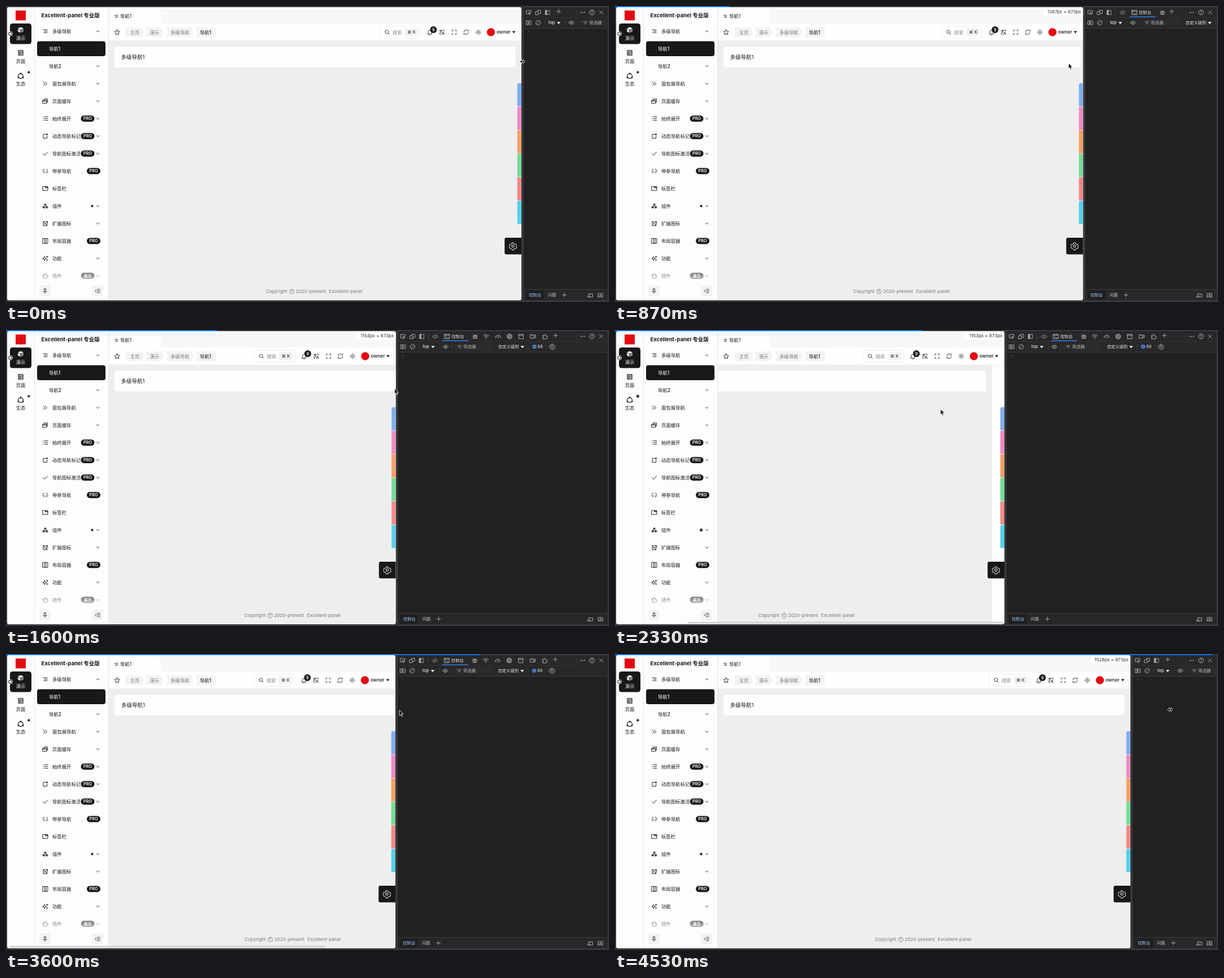
Animation of 1067 by 525 pixels, one loop 4590 ms. Source, as an HTML page:

```html
<!DOCTYPE html>
<html lang="zh-CN">
<head>
<meta charset="utf-8">
<title>布局演示</title>
<style>
html, body { margin: 0; width: 100%; height: 100%; overflow: hidden; background: #303133; }
svg { display: block; width: 1067px; height: 525px; }
text { font-family: Inter, "Noto Sans CJK SC", "Noto Sans CJK", sans-serif; white-space: pre; }
</style>
</head>
<body>
<svg id="stage" viewBox="0 0 1067 525"></svg>
<script>
const INK = '#18181b';
const MIN_RIGHT = 835;
const LOOP = 4590, STEP = 200 / 3, LAST = 68;

// ---- drawing helpers ----
const rect = (x, y, w, h, fill, r = 0, more = '') =>
  `<rect x="${x}" y="${y}" width="${w}" height="${h}" rx="${r}" fill="${fill}" ${more}/>`;
const dot = (x, y, r, fill, more = '') => `<circle cx="${x}" cy="${y}" r="${r}" fill="${fill}" ${more}/>`;
const text = (x, y, str, size = 8.4, fill = INK, weight = 400, anchor = 'start', more = '') =>
  `<text x="${x}" y="${y + size * 0.36}" font-size="${size}" fill="${fill}" font-weight="${weight}" text-anchor="${anchor}" ${more}>${str}</text>`;
const icon = (x, y, name, size = 11, color = INK, weight = 2) =>
  `<path transform="translate(${x - size / 2} ${y - size / 2}) scale(${size / 24})" d="${ICONS[name]}"
    fill="none" stroke="${color}" stroke-width="${weight}" stroke-linecap="round" stroke-linejoin="round"/>`;
const caret = (x, y, fill, w = 3) => `<path d="M${x - w} ${y - 1.7}h${w * 2}l${-w} 4z" fill="${fill}"/>`;
const group = (id, body, more = '') => `<g id="${id}" ${more}>${body}</g>`;
const ring = (x, y, r) => `M${x - r} ${y}a${r} ${r} 0 1 0 ${2 * r} 0a${r} ${r} 0 1 0 ${-2 * r} 0`;

const ICONS = {
  menu: 'M4 6h16M9 12h11M6 18h14',
  down: 'M5 9l7 7 7-7',
  up: 'M5 16l7-7 7 7',
  twice: 'M4 5l7 7-7 7M12 5l7 7-7 7',
  copies: 'M8 7V3h13v13h-4M2 8h15v13H2zM2 12h15',
  list: 'M9 5h13M9 12h13M9 19h13M3 5h1M3 12h1M3 19h1',
  mark: 'M13 5H4v16h15v-9M17 3h4v4h-4z',
  check: 'M3 13l6 6L21 6',
  braces: 'M7 4c-4 0-2 4-3 6l-2 2 2 2c1 2-1 6 3 6M17 4c4 0 2 4 3 6l2 2-2 2c-1 2 1 6-3 6M9.500 15v1M14.500 15v1',
  tabs: 'M2 4h20v16H2zM12 4v5h10M13 6h8',
  parts: ring(12, 7, 4) + ring(6, 17, 4) + ring(18, 17, 4) + ring(12, 7, 1.5) + ring(6, 17, 1.5) + ring(18, 17, 1.5),
  extend: 'M10 5H4v16h15v-7M13 4h8v8M20 5L9 16M4 5l15 15',
  columns: 'M2 2h20v20H2zM9 2v20M15 2v20',
  spark: 'M9 5l2.500 5.500L17 13l-5.500 2.500L9 21l-2.500-5.500L1 13l5.500-2.500zM19 2v6M16 5h6M19 17v4M17 19h4',
  puzzle: 'M4 8h5c-2-6 7-6 5 0h5v5c6-2 6 7 0 5v4H4v-5c5 1 5-6 0-4z',
  pin: 'M8 3h8M9 3v7l-4 5h14l-4-5V3M12 15v7',
  fold: 'M11 5h11M11 12h11M11 19h11M7 8l-5 4 5 4',
  page: 'M3 3h18v18H3zM3 8h18M7 12h4v5H7zM15 12h3M15 16h3',
  eco: ring(12, 4, 2) + ring(4, 18, 2) + ring(20, 18, 2) + 'M9 5c-5 2-6 6-6 10M15 5c5 2 6 6 6 10M7 20c3 2 7 2 10 0',
  star: 'M12 2l3 6.500 7 .9-5.200 4.900 1.400 7.100L12 18l-6.200 3.400 1.400-7.100L2 9.400l7-.9z',
  search: ring(10.5, 10.5, 7.5) + 'M16 16l6 6',
  bell: 'M5 17V10a7 7 0 0 1 14 0v7l2 2H3zM10 22h4',
  lang: 'M2 5h11M7 2v3M11 5c-1 5-4 8-8 9M4 8c2 4 4 5 7 6M13 22l4.500-11L22 22M15 18h5M16 3h5v5M3 17v4h5',
  full: 'M3 8V3h5M16 3h5v5M21 16v5h-5M8 21H3v-5',
  reload: 'M3 11a9 9 0 0 1 16-5l2 2V3M21 13a9 9 0 0 1-16 5l-2-2v5',
  sun: ring(12, 12, 4.5) + 'M12 1v3M12 20v3M1 12h3M20 12h3M4 4l2 2M18 18l2 2M4 20l2-2M18 6l2-2',
  gear: 'M9.500 2h5l1 3 2.500 1.500 3-.5 2.500 4.300-2 2.200v1l2 2.200-2.500 4.300-3-.5-2.500 1.500-1 3h-5l-1-3L6 18.500l-3 .5-2.500-4.300 2-2.200v-1l-2-2.200L3 6l3 .5L8.500 5z' + ring(12, 12, 3.8),
  inspect: 'M21 11V4H2v14h8M12 11l9 4-4 1.500-2 4.500z',
  device: 'M9 8V3h13v13h-7M2 9h11v12H2z',
  dock: 'M3 3h18v18H3zM3 3h6v18H3zM5 4v16M7 4v16',
  code: 'M7 6l-6 6 6 6M17 6l6 6-6 6M14 4l-4 16',
  console: 'M2 3h20v18H2zM2 7h20M6 11l3 3-3 3M12 17h6',
  bug: 'M7 9h10v7a5 5 0 0 1-10 0zM8 9a4 4 0 0 1 8 0M7 13H2M17 13h5M7 9L3 5M17 9l4-4M7 18l-4 3M17 18l4 3M12 10v10',
  wifi: 'M1 9c7-6 15-6 22 0M5 13c5-4 9-4 14 0M9 17c2-2 4-2 6 0M12 20v1',
  perf: 'M2 17c-1-14 21-14 20 0M12 17l6-9M10 17h4M5 12l2 1',
  chip: 'M5 5h14v14H5zM9 9h6v6H9zM9 1v4M15 1v4M9 19v4M15 19v4M1 9h4M1 15h4M19 9h4M19 15h4',
  app: 'M3 3h18v18H3zM3 8h18',
  camera: 'M2 5h14v14H2zM16 10l6-4v12l-6-4M6 9h3',
  plus: 'M12 3v18M3 12h18',
  help: ring(12, 12, 10) + 'M9 9c0-4 6-4 6 0 0 2-3 2-3 5M12 17v1',
  close: 'M4 4l16 16M20 4L4 20',
  side: 'M2 4h20v16H2zM8 4v16M12 9l5 3-5 3z',
  ban: ring(12, 12, 10) + 'M5 19L19 5',
  eye: 'M1 12c6-9 16-9 22 0-6 9-16 9-22 0z' + ring(12, 12, 3.5),
  filter: 'M2 6h20M6 12h12M10 18h4',
  prompt: 'M8 4l8 8-8 8',
  back: 'M8 7h14v12h-9M9 4L5 8l4 4M10 15H2v5h8z',
  tray: 'M2 4h20v16H2zM2 15h20M12 7v5M9 9l3 3 3-3'
};

// ---- page: left columns ----
const NAV = [
  ['多级导航', 'menu', 'up'], ['导航1'], ['导航2', '', 'down'], ['面包屑导航', 'twice', 'down'],
  ['页面缓存', 'copies', 'down'], ['始终展开', 'list', 'down', 'PRO'], ['动态导航标记', 'mark', 'down', 'PRO'],
  ['导航图标激活', 'check', 'down', 'PRO'], ['带参导航', 'braces', '', 'PRO'], ['标签栏', 'tabs'],
  ['组件', 'parts', 'down'], ['扩展图标', 'extend', 'down'], ['布局容器', 'columns', '', 'PRO'],
  ['功能', 'spark', 'down'], ['插件', 'puzzle', 'down', '演示']
];

function navItem([label, pic, chevron, badge], i) {
  const y = 44.7 + i * 31, active = i === 1, x = pic ? 82 : 76;
  let out = active ? rect(55, 62.500, 121, 26.500, INK, 4) : '';
  out += text(x, y, label, 8.4, active ? '#fff' : INK, 500);
  if (pic) out += icon(69.500, y, pic, 10.500, INK, 2.2);
  if (chevron) out += icon(162.500, y, chevron, 7.500, INK, 3);
  if (badge) {
    const bx = chevron ? 132.500 : 143;
    out += rect(bx, y - 5.500, 24, 11, INK, 5.500) + text(bx + 12, y, badge, 7.2, '#fff', 600, 'middle');
  }
  return out;
}

const pulse = (x, y) => dot(x, y, 2, INK, 'class="ping"') + dot(x, y, 2, INK);

const sidebar =
  rect(0, 0, 181.500, 525, '#fdfdfd') + rect(50, 0, 1, 525, '#e6e6e8') + rect(181, 0, 1, 525, '#e4e4e6') +
  rect(17, 8, 18, 17.500, '#e30b13') +
  rect(7, 31, 38, 36.500, INK, 4.500) +
  dot(7.500, 49.300, 4.300, '#fdfdfd') + dot(7.500, 49.300, 3.300, INK) + dot(7.500, 49.300, 2.300, '#fff') +
  '<path d="M26 37.500l5 2.200-5 2.300-5-2.300z" fill="#fff"/><path d="M21 40.500l4.500 2v5l-4.500-2.200z" fill="#ddd"/><path d="M31 40.500l-4.500 2v5l4.500-2.200z" fill="#888"/>' +
  text(26, 57, '演示', 8.4, '#fff', 500, 'middle') +
  icon(26, 83, 'page', 11, INK, 2.3) + text(26, 97.500, '页面', 8.4, INK, 500, 'middle') +
  icon(26, 123.700, 'eco', 12, INK, 2.2) + text(26, 138, '生态', 8.4, INK, 500, 'middle') +
  pulse(40.300, 117.500) +
  text(62.500, 17, 'Excellent-panel 专业版', 9.5, INK, 700) +
  NAV.map(navItem).join('') + pulse(152.500, 354.700) +
  rect(51, 462, 130, 31, 'url(#fade)') + rect(51, 493, 130, 32, '#fdfdfd') +
  rect(59.500, 496, 19, 19, '#f2f2f3', 3) + icon(69, 505.500, 'pin', 10) +
  rect(152.500, 496, 19, 19, '#f2f2f3', 3) + icon(162, 505.500, 'fold', 10);

// ---- page: header ----
const crumb = (x, end, label, first, last) =>
  `<path d="M${x} 38h${end - x - 4}${last ? 'q4 0 4 4v9q0 4-4 4' : 'l4 8.500-4 8.500'}h${x - end + 4}${first ? '' : 'l4-8.500'}z" fill="#f3f3f4"/>` +
  text((x + end) / 2 + (first || last ? 0 : 0.500), 46.500, label, 8.4, last ? INK : '#77777c', last ? 500 : 400, 'middle');

const headerLeft =
  rect(181.500, 0, 900, 31, '#f7f7f7') + rect(181.500, 31, 900, 31, '#fefefe') + rect(181.500, 61.500, 900, .6, '#e6e6e8') +
  '<path d="M181 31q3 0 3-4V11q0-5 5-5h80q5 0 5 5v16q0 4 4 4z" fill="#fefefe"/>' +
  icon(195, 18.300, 'menu', 8, INK, 2.3) + text(202, 18.300, '导航1', 8.4, INK, 400) +
  icon(196.700, 46.500, 'star', 11) +
  crumb(212, 244, '主页', true) + crumb(246, 279, '演示') + crumb(282.500, 332, '多级导航') + crumb(334.500, 371.500, '导航1', false, true);

const STRIPS = ['#82aef0', '#ee8cc2', '#f5a066', '#77db98', '#f08a8a', '#5ad0ea'];

const headerRight =
  rect(-250, 36, 72, 21, '#fff', 4, 'stroke="#e6e6e8" stroke-width=".8"') +
  icon(-237.500, 46.500, 'search', 9.500) + text(-228, 46.500, '搜索', 8.4, '#8a8a90') +
  rect(-206, 40, 23, 13, '#f3f3f4', 3, 'stroke="#e6e6e8" stroke-width=".6"') + text(-194.500, 46.500, '⌘ K', 7.6, INK, 400, 'middle') +
  icon(-162, 47, 'bell', 10) + dot(-155.700, 42, 6, INK) + text(-155.700, 42, '9', 7, '#fff', 600, 'middle') +
  icon(-140.700, 46.500, 'lang', 10) + icon(-119, 46.500, 'full', 10) +
  icon(-97.800, 46.500, 'reload', 10.500) + icon(-76.300, 46.500, 'sun', 10) +
  dot(-54, 46.500, 7.200, '#e30b13') + text(-44, 46.500, 'owner', 8.3, INK, 500) + caret(-13.500, 46.300, INK, 2.800);

const dockRight =
  STRIPS.map((c, i) => rect(-7.300, 137 + i * 41.750, 20, 41, c, i % 5 ? 0 : 2.500)).join('') +
  rect(-29.700, 411, 50, 29.500, INK, 3) + icon(-15, 425.800, 'gear', 14, '#fff', 1.7);

const footer =
  text(-87, 506.500, 'Copyright', 8.1, '#77777c') + dot(-41.300, 506.500, 4.200, 'none', 'stroke="#77777c" stroke-width=".8"') +
  text(-41.300, 506.400, 'C', 5.6, '#77777c', 500, 'middle') +
  text(-34, 506.500, '2020-present', 8.1, '#77777c') + text(24.300, 506.500, 'Excellent-panel', 8.1, '#77777c');

// ---- developer tools, x measured from the divider ----
const GREY = '#c4c6c8', LINE = '#414245', BLUE = '#7cacf8';
const tool = (x, y, name, size = 10.500) => icon(x, y, name, size, GREY, 1.9);
const sep = (x, y) => rect(x, y - 5, .7, 10, LINE);

// position of each tab, then of the plus sign that follows it
const TABS = [['code', 70, 87], ['console', 91, 129], ['bug', 140.500, 157], ['wifi', 160, 179], ['perf', 181, 200],
  ['chip', 201.500, 220], ['app', 222, 241], ['camera', 243, 262], ['puzzle', 264, 283]];

const tabBody = ([name, x]) => `<g class="tab">${tool(x, 11.500, name)}${name === 'console'
  ? text(98.800, 11.500, '控制台', 7.4, '#e3e3e3') + rect(82.500, 18.300, 46, 1.500, '#2d7de0') : ''}</g>`;

const toolsMoving =
  rect(4, 2, 900, 520, '#212121', 3) + rect(4, 2, 900, 37.500, '#28282a', 3) +
  rect(4, 20.300, 900, .6, '#3a3b3d') + rect(4, 39, 900, .7, LINE) +
  rect(4, 502, 900, 20, '#28282a') + rect(4, 502, 900, .7, LINE) +
  tool(13, 11.500, 'inspect') + tool(29.700, 11.500, 'device') + tool(46.300, 11.500, 'dock', 9.500) + sep(57.500, 11.500) +
  TABS.map(tabBody).join('') + group('plus', tool(0, 9.700, 'plus', 9.500)) +
  tool(13, 29.700, 'side', 10) + tool(29.700, 29.700, 'ban', 10) + sep(41.500, 29.700) +
  text(47.800, 29.700, 'top', 7.4, '#e8e8e8', 500) + caret(66, 30, '#e8e8e8', 3.300) + sep(77, 29.700) +
  tool(88.500, 29.700, 'eye', 10) + sep(99.500, 29.700) +
  rect(103, 24, 70, 11.500, '#2c2c2e', 5) + tool(113, 29.700, 'filter', 8) + text(120, 29.700, '筛选器', 7.4, '#b6b8ba') +
  text(181.500, 29.700, '自定义级别', 7.3, '#e8e8e8', 500) + caret(224.300, 30, '#e8e8e8', 3.300) + sep(234, 29.700) +
  dot(245.500, 29.500, 3.600, '#4b8df0') + rect(243.700, 28.300, 3.600, .8, '#212121') + rect(243.700, 30, 3.600, .8, '#212121') +
  text(251, 29.200, '88', 7.5, '#e3e3e3') + sep(266, 29.700) + tool(277, 29.500, 'gear', 10.500) +
  icon(12.500, 45, 'prompt', 6, '#5178c4', 2.5) +
  rect(8, 504, 32, 17, '#1f2022') + text(13.300, 512.500, '控制台', 7.3, '#a8c7fa') +
  text(46.800, 512.500, '问题', 7.3, GREY) + tool(76, 512.500, 'plus', 9.500);

const toolsFixed =
  sep(1010, 11.500) + [1017.300, 1020.500, 1023.700].map(x => dot(x, 11.300, .85, GREY)).join('') +
  tool(1037, 11.300, 'help') + tool(1053, 11.300, 'close', 9) + tool(1033.700, 513, 'back') + tool(1052, 513, 'tray', 9.500);

const pointer = 'M0 0v9.800l2.300-2.100 1.600 3.600 1.700-.8-1.600-3.500h3.200z';
const resizer = 'M-4.700 0l3.300-3.300v2.100h2.800v-2.100l3.300 3.300-3.300 3.300v-2.100h-2.800v2.100z';

document.getElementById('stage').innerHTML =
  `<defs>
    <linearGradient id="fade" x2="0" y2="1"><stop stop-color="#fdfdfd" stop-opacity="0"/><stop offset="1" stop-color="#fdfdfd"/></linearGradient>
    <clipPath id="pageClip">${rect(2, 2, 910, 520, '#000', 4, 'id="pageBox"')}</clipPath>
    <clipPath id="toolClip">${rect(0, 2, 1064.500, 520, '#000', 3)}</clipPath>
  </defs>` +
  rect(0, 0, 1067, 525, '#38393b') +
  group('tools', group('moving', toolsMoving) + toolsFixed, 'clip-path="url(#toolClip)"') +
  group('page',
    rect(0, 0, 1067, 525, '#fdfdfd') +
    group('content',
      rect(181.500, 62, 0, 463, '#eeeeee', 0, 'id="ground"') +
      rect(191.300, 71.500, 0, 38, '#fefefe', 4, 'id="card" stroke="#e3e3e5" stroke-width=".6"') +
      text(203.500, 90.800, '多级导航1', 9.5, INK, 400) + group('footer', footer)) +
    headerLeft + group('right', headerRight + dockRight) + sidebar +
    rect(6, 517.500, 559, 3.500, '#d6d6d8', 1.700, 'id="thumb"') +
    group('tip', rect(-70, 0, 80, 17, '#fff', 2) + text(-3.500, 9.800, '', 8, '#333', 400, 'end', 'id="size"')),
    'clip-path="url(#pageClip)"') +
  rect(0, 0, 0, 2, '#0f6fe8', 0, 'id="bar"') +
  `<path id="cursor" stroke="#fff" stroke-width=".8" stroke-linejoin="round" fill="#111"/>`;

// ---- motion: [time, values...] ----
const DIVIDER = [[0, 912], [600, 912], [733, 876], [867, 828], [1000, 776], [1133, 728], [1200, 705], [1333, 694], [1533, 690], [1700, 689],
  [4000, 689], [4133, 698], [4200, 709], [4267, 731], [4333, 776], [4467, 874], [4533, 912]];
const SCROLL = [[0, 0], [2000, 0], [2100, 45], [2200, 125], [2333, 168], [2467, 152], [2600, 146], [2800, 146], [2933, 95], [3067, 30],
  [3133, 0], [3267, -20], [3333, -11], [3400, -5], [3467, -2.500], [3600, -.6], [3733, 0]];
const CURSOR = [[0, 914, 98.500], [530, 914, 98.500], [600, 900, 100], [867, 802.500, 101.500], [1200, 698.500, 102.500], [1333, 690, 103],
  [1667, 687, 104], [2067, 590, 138], [2333, 576, 140.500], [3267, 576, 140.500], [3600, 696, 99.500], [3867, 691, 98.500],
  [4067, 710, 98.500], [4267, 864.500, 98.500], [4533, 982.500, 98.500]];

function at(track, t) {
  const i = track.findIndex(k => k[0] > t);
  if (i < 0) return track[track.length - 1].slice(1);
  const a = track[i - 1], b = track[i], p = (t - a[0]) / (b[0] - a[0]);
  return a.slice(1).map((v, j) => v + (b[j + 1] - v) * p);
}

const $ = id => document.getElementById(id);
const set = (id, name, value) => $(id).setAttribute(name, value);
const move = (id, x, y = 0) => set(id, 'transform', `translate(${x} ${y})`);
const show = (el, on) => el.setAttribute('visibility', on ? 'visible' : 'hidden');
const pings = document.querySelectorAll('.ping'), tabs = document.querySelectorAll('.tab');

function draw(n) {
  const t = n * STEP;
  const [edge] = at(DIVIDER, t), [scroll] = at(SCROLL, t), [cx, cy] = at(CURSOR, t);
  const right = Math.max(edge, MIN_RIGHT);

  set('pageBox', 'width', edge - 2);
  set('ground', 'width', right - 181.500);
  set('card', 'width', right - 201.300);
  move('footer', (182 + right) / 2);
  move('content', -scroll);
  move('right', edge);
  set('thumb', 'x', 6 + 122 * Math.min(1, Math.max(0, scroll / 146)));
  show($('thumb'), t > 2010 && t < 3900);

  move('tip', edge);
  show($('tip'), (t > 610 && t < 2680) || t > 4010);
  $('size').textContent = `${Math.round((edge - 3.350) * 1.6815)}px × 873px`;

  move('moving', edge);
  const shown = TABS.filter(tab => edge + tab[2] <= 990).length;
  tabs.forEach((el, i) => show(el, i < shown));
  move('plus', shown ? TABS[shown - 1][2] : 66);

  const p = Math.min(1, ((t + 900) % 1000) / 750), grow = 1 - (1 - p) ** 3;
  pings.forEach(el => {
    el.setAttribute('r', 2 + 2 * grow);
    el.setAttribute('opacity', 1 - grow);
  });

  set('bar', 'width', n * 15.550);
  set('cursor', 'd', t < 590 || t > 3850 ? resizer : pointer);
  move('cursor', cx, cy);
}

const start = performance.now();
function tick(now) {
  const t = Math.max(0, now - start) % LOOP;
  draw(Math.min(LAST, Math.floor((t + 4) / STEP)));
  requestAnimationFrame(tick);
}
draw(0);
requestAnimationFrame(tick);
</script>
</body>
</html>
```
